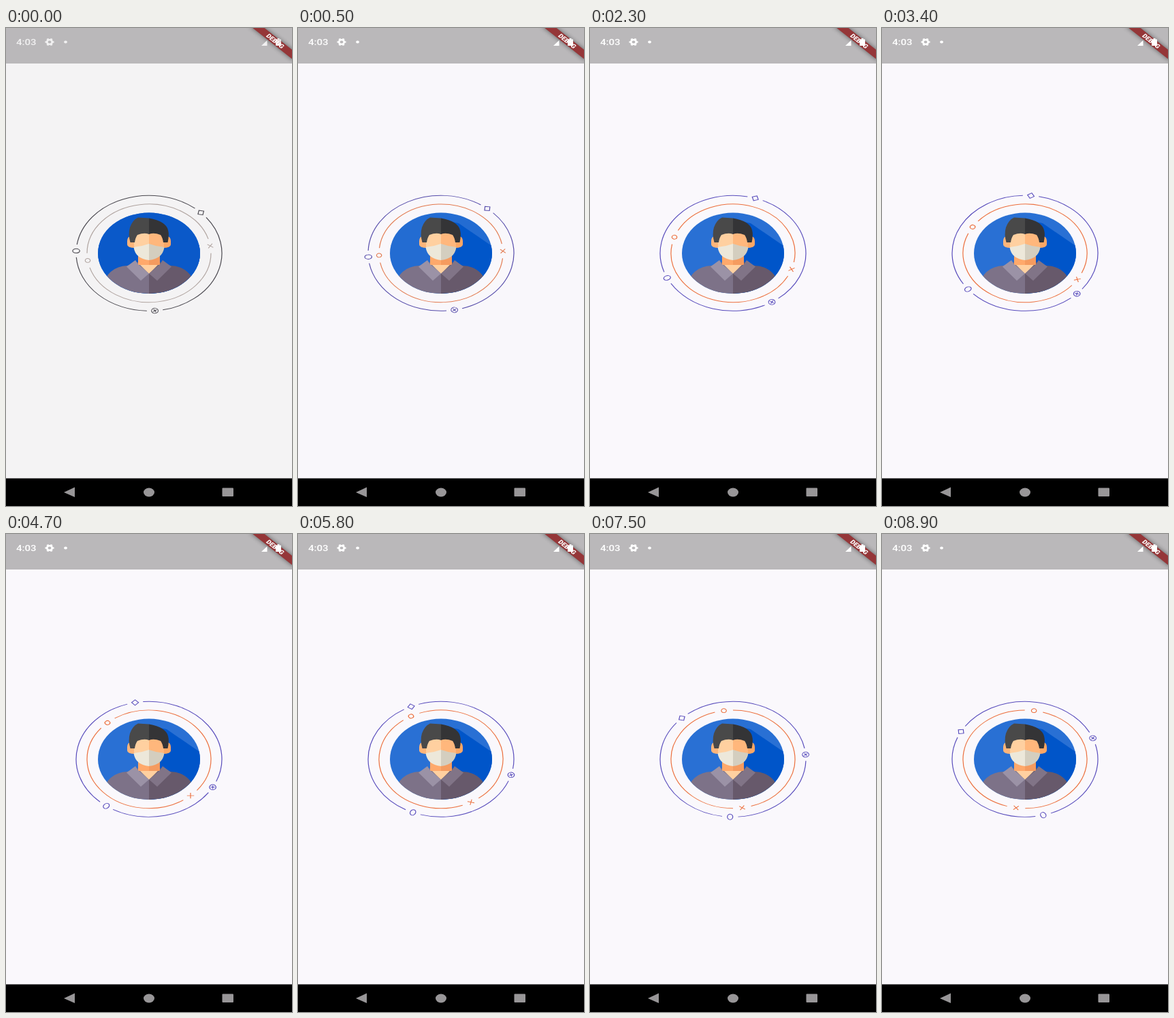
An HTML page that plays this animation: 420x700 px, repeating every 9 s.

```html
<!DOCTYPE html>
<html lang="en">
<head>
<meta charset="utf-8">
<title>Rotating avatar rings</title>
<style>
  html, body { margin: 0; width: 100%; height: 100%; overflow: hidden; background: #faf8fc; }
  svg { display: block; width: 100vw; height: 100vh; }
  text { font-family: Roboto, Arial, sans-serif; fill: #fff; }
  .ring { fill: none; stroke-width: 1.2; }
</style>
</head>
<body>
<svg viewBox="0 0 420 700">
  <defs>
    <clipPath id="disc"><ellipse cx="210" cy="329.7" rx="75" ry="59.2"/></clipPath>
    <filter id="blur" x="-30%" y="-150%" width="160%" height="400%"><feGaussianBlur stdDeviation="3.9"/></filter>
  </defs>
  <rect id="page" width="420" height="700" fill="#faf8fc"/>
  <rect width="420" height="52" fill="#bab8ba"/>

  <!-- corner ribbon -->
  <svg width="420" height="52" overflow="visible">
    <g transform="translate(420) scale(1.02 .8) rotate(45)">
      <rect x="-44" y="28" width="88" height="12" opacity=".5" filter="url(#blur)"/>
      <rect x="-44" y="28" width="88" height="12" fill="#953638"/>
      <text y="37.6" font-size="10.2" font-weight="900" text-anchor="middle">DEBUG</text>
    </g>
  </svg>

  <!-- status bar -->
  <g id="status" fill="#fff">
    <text transform="translate(15 25) scale(1 .79)" font-size="15" font-weight="500">4:03</text>
    <g transform="translate(64 20.5) scale(1 .85)" fill="none" stroke="#fff">
      <circle r="3.8" stroke-width="2.8"/>
      <circle r="5.6" stroke-width="2" pathLength="12" stroke-dasharray="1" stroke-dashoffset=".5"/>
    </g>
    <ellipse cx="87.5" cy="20.5" rx="2.4" ry="2"/>
    <path d="M375 26h8.5v-8z"/>
    <path d="M396 16.5h2.500v-1.500h3v1.500h2.500v9.500h-8z"/>
  </g>

  <!-- avatar -->
  <g clip-path="url(#disc)">
    <rect x="130" y="265" width="160" height="130" fill="#2970d4"/>
    <path d="M210 280L236 286L290 323V395H210z" fill="#0055c9"/>
    <rect id="tint" x="130" y="265" width="160" height="130" fill="#0a59c9"/>
    <path d="M140 395V380Q150 349 178 348L194 343H210V395z" fill="#7d7288"/>
    <path d="M280 395V380Q270 349 242 348L226 343H210V395z" fill="#67596b"/>
    <path d="M194 344H226L210 360z" fill="#ffd0a0"/>
    <path d="M194 330H210V347H194z" fill="#ffa96b"/>
    <path d="M210 330H226V347H210z" fill="#f59b5f"/>
    <path d="M190 340L177 349.500L198 370L210 359.500L194 346z" fill="#9b92a6"/>
    <path d="M230 340L243 349.500L222 370L210 359.500L226 346z" fill="#817487"/>
    <path d="M190 305H183Q178 306 178 312V317Q178 322 190 322z" fill="#ffb57a"/>
    <path d="M230 305H237Q242 306 242 312V317Q242 322 230 322z" fill="#fda765"/>
    <path d="M188 297H210V338Q188 336 188 318z" fill="#ffd0a0"/>
    <path d="M232 297H210V338Q232 336 232 318z" fill="#ffb77c"/>
    <path d="M187.500 321Q199 320 210 316V340Q190 338 187.500 321z" fill="#ede8da"/>
    <path d="M232.500 321Q221 320 210 316V340Q230 338 232.500 321z" fill="#d4cebf"/>
    <path d="M182.500 314Q179 302 182 292Q186 281 194 277.500L210 278.500V302Q203 299 193 303Q190 307 189 314z" fill="#494949"/>
    <path d="M237.500 314Q240 303 238 296Q235 283 210 278.500V302Q217 299 227 303Q230 307 231 314z" fill="#343436"/>
  </g>

  <!-- rings -->
  <g transform="translate(210 329.800) scale(1 .79)">
    <g id="outer" class="ring">
      <path class="arcs"/>
      <rect x="-3.6" y="-3.6" width="7.2" height="7.2" transform="rotate(-44.6) translate(107) rotate(56)"/>
      <g transform="rotate(85.4) translate(107) rotate(-29)">
        <circle r="4.8"/><path d="M-3 0H3M0-3V3"/>
      </g>
      <ellipse rx="5.2" ry="4" transform="rotate(182.300) translate(107)"/>
    </g>
    <g id="inner" class="ring">
      <path class="arcs"/>
      <path d="M-5.200 0H5.200M0-5.200V5.200" transform="rotate(-8.500) translate(91) rotate(42)"/>
      <circle r="3.7" transform="rotate(171.500) translate(91)"/>
    </g>
  </g>

  <!-- navigation bar -->
  <rect y="659.500" width="420" height="40.500"/>
  <g fill="#989698">
    <path d="M85 680L101 672.500V687z"/>
    <ellipse cx="210" cy="680" rx="8" ry="6.400"/>
    <rect x="317.500" y="673.500" width="16.500" height="12.500" rx="1"/>
  </g>
</svg>
<script>
const LOOP = 9000, STEP = 100, SPEED = 12, FADE = 600;
const $ = id => document.getElementById(id);

const point = (r, deg) => {
  const a = deg * Math.PI / 180;
  return `${r * Math.cos(a)} ${r * Math.sin(a)}`;
};

// Circle broken by a gap around each marker angle
function drawArcs(id, r, angles, gap) {
  const d = angles.map((a, i) => {
    const next = angles[(i + 1) % angles.length];
    return `M${point(r, a + gap)}A${r} ${r} 0 0 1 ${point(r, next - gap)}`;
  });
  $(id).querySelector('.arcs').setAttribute('d', d.join(''));
}
drawArcs('outer', 107, [-44.6, 85.4, 182.3], 6.3);
drawArcs('inner', 91, [-8.5, 171.5], 8.5);

const mix = (from, to, k) => `rgb(${from.map((v, i) => v + (to[i] - v) * k)})`;

function frame(now) {
  const t = Math.floor(now % LOOP / STEP) * STEP;
  const turn = SPEED * t / 1000;
  const k = Math.min(1, t / FADE);
  $('outer').setAttribute('transform', `rotate(${-turn})`);
  $('inner').setAttribute('transform', `rotate(${turn})`);
  $('outer').setAttribute('stroke', mix([75, 73, 80], [88, 76, 188], k));
  $('inner').setAttribute('stroke', mix([176, 164, 160], [236, 112, 62], k));
  $('page').setAttribute('fill', mix([244, 243, 244], [250, 248, 252], k));
  $('tint').setAttribute('opacity', 1 - k);
  $('status').setAttribute('opacity', 0.8 + 0.2 * k);
  requestAnimationFrame(frame);
}
const start = performance.now();
requestAnimationFrame(() => frame(0));
const base = frame;
frame = now => base(Math.max(0, now - start));
</script>
</body>
</html>
```
